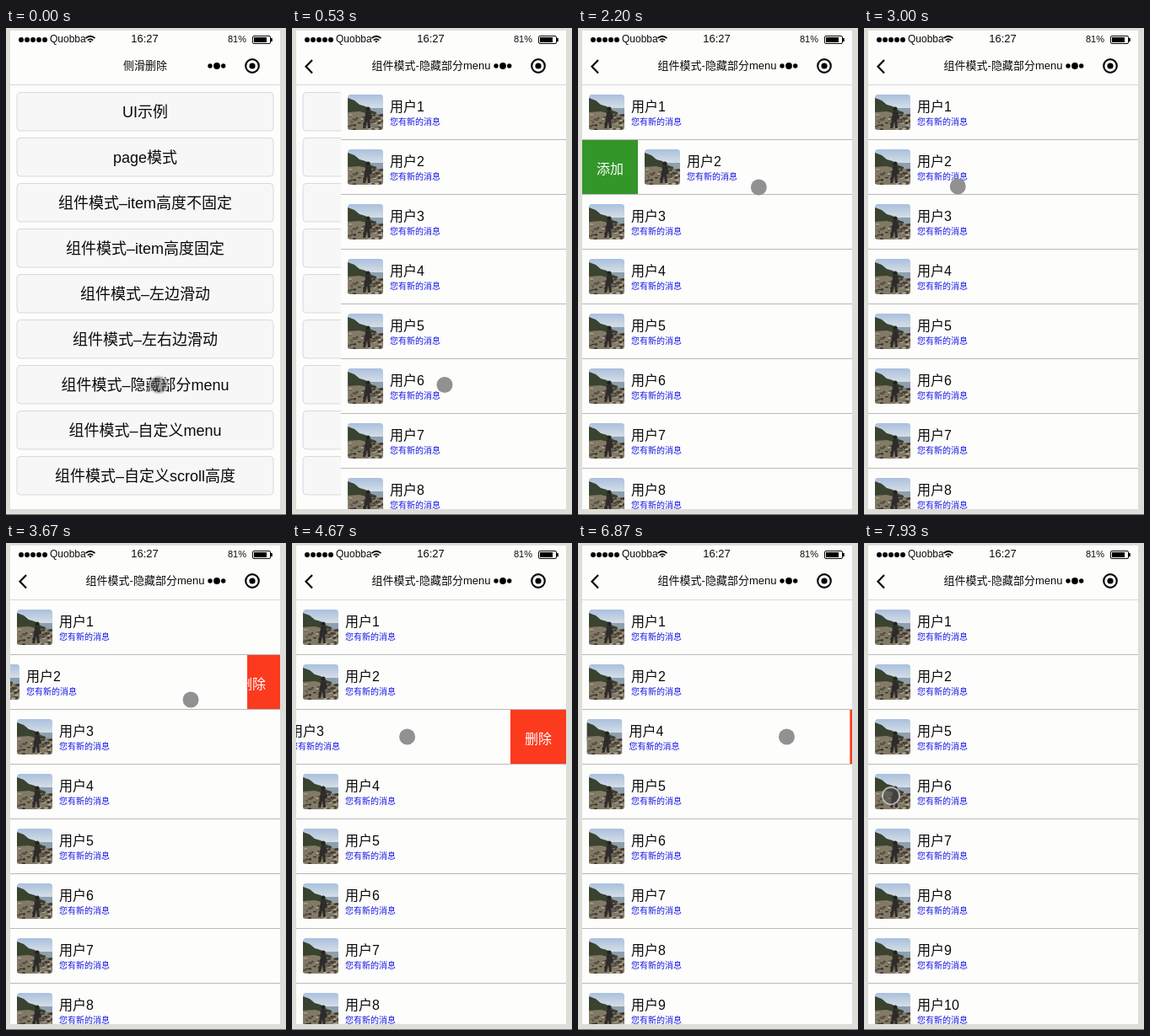
These frames come from a looping animation (332 px wide and 578 px high, 8 s). An HTML page:

```html
<!DOCTYPE html>
<html lang="zh-CN">
<head>
<meta charset="utf-8">
<title>侧滑删除</title>
<style>
html, body { margin: 0; width: 100%; height: 100%; overflow: hidden; background: #deded9; }
svg { display: block; width: 332px; height: 578px; }
text { font-family: "Liberation Sans", "Noto Sans CJK SC", "Noto Sans CJK", sans-serif; fill: #0a0a0a; }
.mid { text-anchor: middle; }
.item { font-size: 18px; }
.name { font-size: 16px; }
.note { font-size: 10px; fill: #1414e6; }
.action { font-size: 16px; fill: #fff; text-anchor: middle; }
.line { fill: none; stroke: #0a0a0a; }
</style>
</head>
<body>
<svg viewBox="0 0 332 578">
  <defs>
    <linearGradient id="sky" x2="0" y2="1">
      <stop offset="0" stop-color="#a9c0de"/>
      <stop offset=".45" stop-color="#dde3e6"/>
    </linearGradient>
    <clipPath id="round"><rect width="42" height="42" rx="3.5"/></clipPath>
    <clipPath id="screen"><rect x="5" y="68" width="320" height="503"/></clipPath>
    <g id="photo" clip-path="url(#round)">
      <rect width="42" height="42" fill="url(#sky)"/>
      <path d="M22 16H42V24H22Z" fill="#8e9fae"/>
      <path d="M0 4L8 7 14 12 21 14 28 19 34 21V26H0Z" fill="#3a4230"/>
      <path d="M0 21L14 20 26 23 42 23V42H0Z" fill="#837a66"/>
      <g id="rocks"></g>
      <circle cx="24" cy="17" r="2.6" fill="#25231f"/>
      <path d="M21 20H27L29 29 26 30 27 40H24L23 32 21 40H18L20 28Z" fill="#2e2c2b"/>
    </g>
  </defs>

  <rect width="332" height="578" fill="#deded9"/>
  <rect y="577" width="332" height="1" fill="#6e6e6c"/>
  <rect x="5" y="3" width="320" height="568" fill="#fdfdfc"/>

  <g id="signal"></g>
  <text x="52" y="17" font-size="12">Quobba</text>
  <path class="line" d="M94.5 12.2Q100 7.2 105.5 12.2M96.8 14.6Q100 11.6 103.2 14.6M98.8 16H101.2" stroke-width="1.8"/>
  <text class="mid" x="164.5" y="17" font-size="13">16:27</text>
  <text x="263" y="17" font-size="11">81%</text>
  <rect class="line" x="292.5" y="9.5" width="21" height="9" rx="1.5"/>
  <path d="M294 11H309V17H294ZM314 12H315.8V16H314Z"/>

  <text id="title" class="mid" x="165" y="49" font-size="13"></text>
  <path id="back" class="line" d="M24 38L16.5 45.8 24 53.5" stroke-width="2.2"/>
  <circle cx="242" cy="45" r="2.7"/><circle cx="250" cy="45" r="3.9"/><circle cx="257.7" cy="45" r="2.7"/>
  <circle cx="292" cy="45" r="3.6"/>
  <circle class="line" cx="292" cy="45" r="7.8" stroke-width="2.2"/>
  <rect x="5" y="67" width="320" height="1" fill="#d6d6d4"/>

  <g clip-path="url(#screen)">
    <g id="menu"></g>
    <g id="page"><rect x="5" y="68" width="320" height="504" fill="#fdfdfc"/><g id="rows"></g></g>
  </g>
  <circle id="touch" stroke="#d8d8d8" stroke-width="2"/>
</svg>
<script>
const LOOP = 8000, PUSH = 300, PUSH_TIME = 400;
const FIRST = 1700, STEP = 850, DRAG = 590, FADE = 120, TAP = 680, OPEN = 66;

const $ = id => document.getElementById(id);
const clamp = v => Math.max(0, Math.min(1, v));
const mix = (a, b, u) => a + (b - a) * u;
const ease = u => u < .5 ? 2 * u * u : 1 - 2 * (1 - u) ** 2;
const fill = (id, list, draw) => { $(id).innerHTML = list.map(draw).join(''); };
const count = n => Array.from({ length: n }, (_, i) => i);

const labels = ['UI示例', 'page模式', '组件模式–item高度不固定', '组件模式–item高度固定',
  '组件模式–左边滑动', '组件模式–左右边滑动', '组件模式–隐藏部分menu',
  '组件模式–自定义menu', '组件模式–自定义scroll高度'];
const users = count(10).map(i => i + 1);

// Evenly spaced drags: the finger goes from x0 to x1, the row to offset `to`
const swipes = [
  { row: 2, to: OPEN, x0: 119, x1: 219, y: 189 },
  { row: 2, to: 0, x0: 200, x1: 100, y: 188 },
  { row: 2, to: -OPEN, x0: 258, x1: 165, y: 186 },
  { row: 3, to: -OPEN, x0: 215, x1: 121, y: 230 },
  { row: 3, to: OPEN, x0: 20, x1: 74, y: 235 },
  { row: 3, to: -OPEN, x0: 250, x1: 160, y: 230, remove: true },
  { row: 4, to: -OPEN, x0: 250, x1: 160, y: 230, remove: true }
].map((s, i) => ({ ...s, start: FIRST + STEP * i, time: DRAG }));

const tap = (start, time, x, y) => ({ start, time, x0: x, x1: x, y });
const removals = swipes.filter(s => s.remove);
const touches = [
  tap(60, 500, 181, 423.5),
  ...swipes,
  ...removals.map(s => tap(s.start + TAP, 60, 292, s.y)),
  tap(7790, 90, 32, 300)
];

let seed = 7;
const random = () => (seed = seed * 16807 % 2147483647) / 2147483647;
const rockTones = ['#4a443b', '#5b5348', '#b3aa98', '#39352f'];

fill('rocks', count(60), i => `<ellipse cx="${random() * 42}" cy="${24 + random() * 18}"
  rx="${1 + random() * 2}" ry="${.6 + random()}" fill="${rockTones[i % 4]}"/>`);
fill('signal', count(5), i => `<circle cx="${18 + 7 * i}" cy="14" r="3"/>`);
fill('menu', labels, (s, i) => `
  <rect x="13" y="${76.5 + 54 * i}" width="304" height="45.5" rx="4" fill="#f7f7f7" stroke="#d9d9d9"/>
  <text class="item mid" x="165" y="${105.5 + 54 * i}">${s}</text>`);
fill('rows', users, n => `<g id="row${n}">
  <g id="actions${n}">
    <rect x="5" width="66" height="65" fill="#339629"/>
    <text class="action" x="38" y="39.5">添加</text>
    <rect x="259" width="66" height="65" fill="#fb3a1e"/>
    <text class="action" x="292" y="39.5">删除</text>
  </g>
  <g id="body${n}">
    <rect x="5" width="320" height="65" fill="#fdfdfc"/>
    <use href="#photo" x="13" y="11"/>
    <text class="name" x="63" y="31.3">用户${n}</text>
    <text class="note" x="63" y="47.3">您有新的消息</text>
  </g>
  <path d="M5 64.5H325" stroke="#b9b9b9"/></g>`);

// A drag moves its own row and closes any other
function offset(n, t) {
  let x = 0;
  for (const s of swipes) {
    if (t < s.start) break;
    const age = t - s.start;
    x = s.row === n
      ? mix(x, s.to, clamp(1.41 * ease(clamp(age / DRAG))))
      : mix(x, 0, clamp(age / 150));
  }
  return x;
}

function drawTouch(t) {
  const dot = $('touch');
  let alpha = 0;
  for (const { start, time, x0, x1, y } of touches) {
    const a = clamp(Math.min(t - start, start + time - t) / FADE + 1);
    if (a <= alpha) continue;
    alpha = a;
    dot.setAttribute('cx', mix(x0, x1, ease(clamp((t - start) / time))));
    dot.setAttribute('cy', y);
  }
  const tone = mix(45, 145, alpha ** 2);
  dot.setAttribute('r', 9.5 + (1 - alpha) * 1.5);
  dot.setAttribute('fill', `rgb(${tone},${tone},${tone})`);
  dot.setAttribute('fill-opacity', alpha);
  dot.setAttribute('stroke-opacity', Math.min(1, 3 * alpha * (1 - alpha)));
}

function drawRows(t) {
  let slot = 0;
  for (const n of users) {
    const gone = removals.some(s => s.row === n && t >= s.start + TAP + 20);
    $('row' + n).style.display = gone ? 'none' : '';
    if (gone) continue;
    const x = offset(n, t);
    $('row' + n).setAttribute('transform', `translate(0 ${68 + 65 * slot++})`);
    $('body' + n).setAttribute('transform', `translate(${x})`);
    $('actions' + n).style.display = x ? '' : 'none';
  }
}

function draw(t) {
  const pushed = t >= PUSH;
  const left = 1 - clamp((t - PUSH) / PUSH_TIME);
  $('title').textContent = pushed ? '组件模式-隐藏部分menu' : '侧滑删除';
  $('back').style.display = pushed ? '' : 'none';
  $('page').setAttribute('transform', `translate(${320 * left ** 2.1})`);
  drawRows(t);
  drawTouch(t);
}

let start;
function tick(now) {
  start ??= now;
  draw((now - start) % LOOP);
  requestAnimationFrame(tick);
}
draw(0);
requestAnimationFrame(tick);
</script>
</body>
</html>
```
